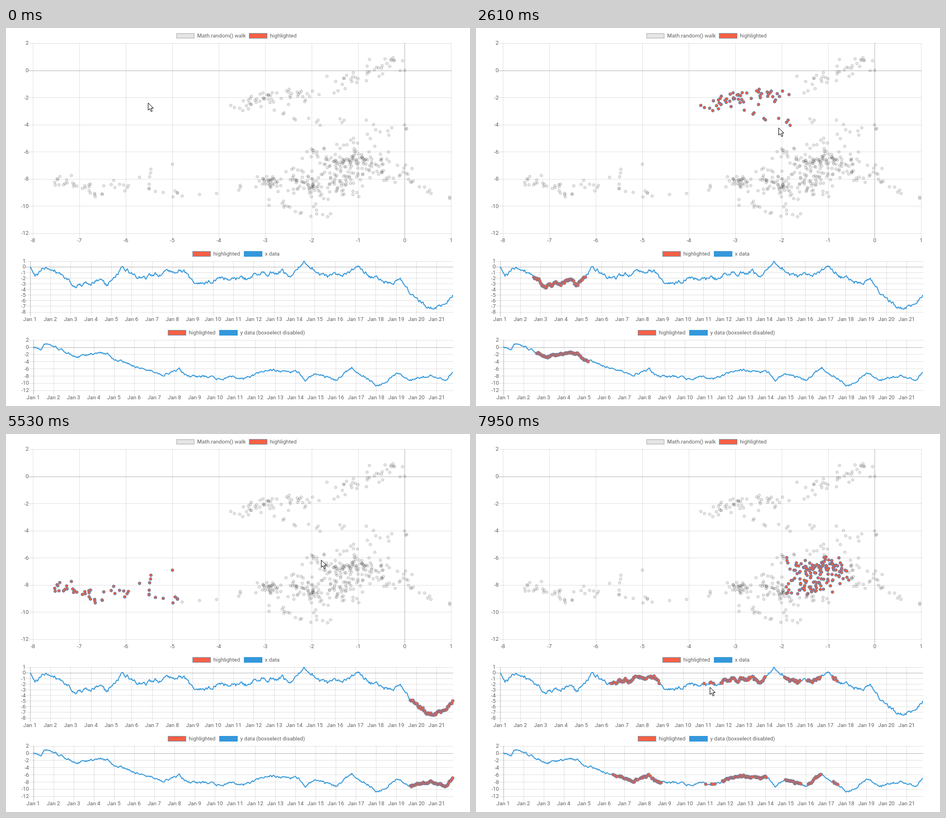
These frames come from a looping animation (829 by 676 pixels, 8 s). An HTML page with a canvas:

```html
<!DOCTYPE html>
<html lang="en">
<head>
<meta charset="utf-8">
<title>Box selection across linked charts</title>
<style>
html, body { margin: 0; width: 100%; height: 100%; overflow: hidden; background: #fff; }
canvas { display: block; width: 829px; height: 676px; }
</style>
</head>
<body>
<canvas id="stage" width="829" height="676"></canvas>
<script>
const W = 829, H = 676, LOOP = 8000, HOURS = 500;
const GRID = 'rgba(0,0,0,0.1)', ZERO = 'rgba(0,0,0,0.25)';
const BLUE = '#3498db', RED = '#f46045', RING = '#4682b4', EDGE = '#7d9db3';
const GREY = 'rgba(0,0,0,0.1)', GREY_RING = 'rgba(0,0,0,0.14)';

// Each chart maps data values to stage pixels.
const scatter = { x0: 712.4, kx: 83.05, y0: 75.6, ky: 24.28, left: 48, right: 796, top: 27, bottom: 367 };
const chartX = { x0: 42.7, kx: 1.514, y0: 427.1, ky: 10.05, left: 42.7, right: 799, top: 417, bottom: 507.5 };
const chartY = { x0: 48.5, kx: 1.502, y0: 570.5, ky: 6.46, left: 48.5, right: 799, top: 557.6, bottom: 648 };
const px = (c, v) => c.x0 + v * c.kx;
const py = (c, v) => c.y0 - v * c.ky;

// Main turns of each walk as [hour, value]; seeded wandering fills the rest.
const turnsX = [
  [0, 0], [6, -1.9], [16, -.2], [28, -.3], [42, -1.9], [54, -3.3], [72, -3.1], [83, -2.1], [90, -3.4],
  [109, -.2], [132, -2.2], [165, -.6], [182, -.7], [193, -2.8], [204, -3.3], [222, -2], [256, -2.2],
  [272, -1], [298, -.8], [306, -2], [323, .7], [351, -1.9], [390, -.4], [402, -1.7], [428, -3.2],
  [437, -2.4], [449, -4.7], [471, -7.4], [482, -7.1], [499, -5.2]
];
const turnsY = [
  [0, 0], [9, -.6], [14, .8], [24, .2], [38, -1.3], [52, -2.8], [75, -1.8], [89, -1.8], [98, -3.6],
  [122, -5.3], [154, -7.6], [174, -6.4], [184, -8.2], [214, -8.3], [224, -9.2], [238, -7.9], [250, -8.8],
  [282, -6.3], [316, -7.1], [323, -9.2], [336, -7.6], [360, -9.2], [379, -5.8], [411, -10.8],
  [432, -7.2], [450, -8.9], [475, -7.8], [491, -9], [499, -7.1]
];

function random(seed) {
  return () => {
    seed = (seed + 0x6D2B79F5) | 0;
    let r = Math.imul(seed ^ (seed >>> 15), 1 | seed);
    r = (r + Math.imul(r ^ (r >>> 7), 61 | r)) ^ r;
    return ((r ^ (r >>> 14)) >>> 0) / 4294967296;
  };
}

function wander(turns, seed, step) {
  const rand = random(seed), values = [];
  let drift = 0, k = 0;
  for (let h = 0; h < HOURS; h++) {
    while (k < turns.length - 2 && h > turns[k + 1][0]) k++;
    const [h0, v0] = turns[k], [h1, v1] = turns[k + 1];
    values.push(v0 + (v1 - v0) * (h - h0) / (h1 - h0) + drift);
    drift = drift * 0.7 + (rand() - 0.5) * step;
  }
  return values;
}
const xs = wander(turnsX, 41, 0.62);
const ys = wander(turnsY, 97, 0.56);
const walk = xs.map((x, i) => ({ x, y: ys[i] }));

// Three drags, each opening a box from its first point to its last.
const drags = [
  { t0: 1120, t1: 1600, n: 7, path: [384, 95, 473, 135.5, 562, 176], a: 2, b: 4.35, lag: 0.05, press: 1120, up: 1920, done: 1980 },
  { t0: 3480, t1: 4000, n: 8, path: [65, 237, 188, 307, 311, 317], a: 1.3, b: 1.66, lag: 0.07, press: 3390, up: 4160, done: 4160 },
  { t0: 5700, t1: 6220, n: 8, path: [551, 217, 608, 253, 666, 288], a: 1.3, b: 1.7, lag: 0.06, press: 5700, up: 6460, done: 6460 }
];
const moves = [
  { t0: 350, t1: 1040, n: 10, path: [254, 134, 320, 112, 384, 95], a: 1.5, b: 2 },
  drags[0],
  { t0: 2610, t1: 3390, n: 11, path: [562, 176, 313, 207, 65, 237], a: 1.6, b: 2 },
  drags[1],
  { t0: 4820, t1: 5620, n: 11, path: [311, 317, 625, 250, 551, 217], a: 1.4, b: 1.5 },
  drags[2],
  { t0: 7170, t1: 7950, n: 11, path: [666, 288, 540, 660, 418, 453], a: 1.4, b: 1.7 }
];

function along([x0, y0, cx, cy, x1, y1], u) {
  const v = 1 - u;
  return { x: v * v * x0 + 2 * u * v * cx + u * u * x1, y: v * v * y0 + 2 * u * v * cy + u * u * y1 };
}
// The pointer was sampled in steps, so time is held between them.
function poseOf(m, t, lag = 0) {
  const gap = (m.t1 - m.t0) / (m.n - 1);
  const k = Math.floor((t - m.t0) / gap + 1e-6) + 1;
  let s = Math.min(1, Math.max(0, k / m.n));
  if (s < 1) s = Math.max(0, s - lag);
  return along(m.path, 1 - Math.pow(1 - Math.pow(s, m.a), m.b));
}

for (const d of drags) {
  const [x0, y0, , , x1, y1] = d.path;
  d.hits = walk.map((p, i) => i).filter(i => {
    const x = px(scatter, walk[i].x), y = py(scatter, walk[i].y);
    return x >= x0 && x <= x1 && y >= y0 && y <= y1;
  });
}

function line(g, x0, y0, x1, y1, color) {
  g.strokeStyle = color;
  g.lineWidth = 1;
  g.beginPath();
  g.moveTo(x0, y0);
  g.lineTo(x1, y1);
  g.stroke();
}
const crisp = v => Math.round(v) + 0.5;

function text(g, s, x, y, align) {
  g.font = '9.7px Roboto, Arial, sans-serif';
  g.fillStyle = '#5e5e5e';
  g.textAlign = align;
  g.textBaseline = 'middle';
  g.fillText(s, x, y);
}

function gridX(g, c, x, label, strong) {
  line(g, crisp(x), c.top, crisp(x), c.bottom + 8, strong ? ZERO : GRID);
  text(g, label, x, c.bottom + 13.5, 'center');
}
function gridY(g, c, v) {
  const y = py(c, v);
  line(g, c.left - 8, crisp(y), c.right, crisp(y), v === 0 ? ZERO : GRID);
  text(g, String(v), c.left - 7.5, y + 0.5, 'right');
}

function legend(g, x, y, fill, border, width, label) {
  g.fillStyle = fill;
  g.fillRect(x, y - 5, 33, 10);
  g.strokeStyle = border;
  g.lineWidth = width;
  g.strokeRect(x + width / 2, y - 5 + width / 2, 33 - width, 10 - width);
  text(g, label, x + 37.5, y + 0.5, 'left');
}

function dot(g, x, y, r, fill, ring, width) {
  g.beginPath();
  g.arc(x, y, r, 0, Math.PI * 2);
  g.fillStyle = fill;
  g.fill();
  g.strokeStyle = ring;
  g.lineWidth = width;
  g.stroke();
}

function plotLine(g, c, values) {
  g.beginPath();
  values.forEach((v, i) => g.lineTo(px(c, i), py(c, v)));
  g.strokeStyle = BLUE;
  g.lineWidth = 1.7;
  g.lineJoin = 'round';
  g.stroke();
}

function drawCharts(g) {
  g.fillStyle = '#fff';
  g.fillRect(0, 0, W, H);
  for (let v = -8; v <= 1; v++) gridX(g, scatter, px(scatter, v), String(v), v === 0);
  for (let v = 2; v >= -12; v -= 2) { gridY(g, scatter, v); gridY(g, chartY, v); }
  for (let v = 1; v >= -8; v--) gridY(g, chartX, v);
  for (const c of [chartX, chartY])
    for (let d = 0; d <= 20; d++) gridX(g, c, px(c, d * 24), 'Jan ' + (d + 1), d === 0);

  legend(g, 304, 14, GREY, GREY, 2, 'Math.random() walk');
  legend(g, 434, 14, RED, EDGE, 1, 'highlighted');
  legend(g, 333, 404, RED, EDGE, 1, 'highlighted');
  legend(g, 425, 404, BLUE, BLUE, 1, 'x data');
  legend(g, 289, 545, RED, EDGE, 1, 'highlighted');
  legend(g, 381, 545, BLUE, BLUE, 1, 'y data (boxselect disabled)');

  for (const p of walk) dot(g, px(scatter, p.x), py(scatter, p.y), 2.5, GREY, GREY_RING, 1);
  plotLine(g, chartX, xs);
  plotLine(g, chartY, ys);
}

function drawHits(g, hits) {
  for (const i of hits) {
    const { x, y } = walk[i];
    dot(g, px(scatter, x), py(scatter, y), 2.5, RED, RING, 0.9);
    dot(g, px(chartX, i), py(chartX, x), 2.7, RED, RING, 0.7);
    dot(g, px(chartY, i), py(chartY, y), 2.7, RED, RING, 0.7);
  }
}

function drawBox(g, d, t) {
  const [x, y] = d.path, end = poseOf(d, t, d.lag);
  const w = Math.round(end.x) - x, h = Math.round(end.y) - y;
  g.fillStyle = 'rgba(66,133,244,0.2)';
  g.fillRect(x, y, w, h);
  g.strokeStyle = '#4488ff';
  g.lineWidth = 1;
  g.strokeRect(x, y, w, h);
}

function drawPointer(g, { x, y }) {
  const shape = [0, 0, 0, 13, 3, 10.3, 5.3, 15.5, 7.4, 14.6, 5.2, 9.6, 9.3, 9.4];
  g.beginPath();
  for (let i = 0; i < shape.length; i += 2) g.lineTo(x + shape[i], y + shape[i + 1]);
  g.closePath();
  g.fillStyle = '#fff';
  g.fill();
  g.strokeStyle = '#111';
  g.lineWidth = 1;
  g.lineJoin = 'miter';
  g.stroke();
}

const base = document.createElement('canvas');
base.width = W;
base.height = H;
drawCharts(base.getContext('2d'));
const ctx = document.getElementById('stage').getContext('2d');

function draw(t) {
  ctx.drawImage(base, 0, 0);
  const picked = drags.filter(d => t >= d.done).pop();
  if (picked) drawHits(ctx, picked.hits);

  const boxed = drags.find(d => t >= d.t0 && t < d.done);
  if (boxed) drawBox(ctx, boxed, t);

  const move = moves.filter(m => t >= m.t0).pop();
  const tip = move ? poseOf(move, t) : { x: 254, y: 134 };
  if (drags.some(d => t >= d.press && t < d.up)) {
    ctx.fillStyle = 'rgba(255,250,60,0.75)';
    ctx.beginPath();
    ctx.arc(tip.x, tip.y, 10, 0, Math.PI * 2);
    ctx.fill();
  }
  drawPointer(ctx, tip);
}

const start = performance.now();
function tick() {
  draw((performance.now() - start) % LOOP);
  requestAnimationFrame(tick);
}
tick();
</script>
</body>
</html>
```
